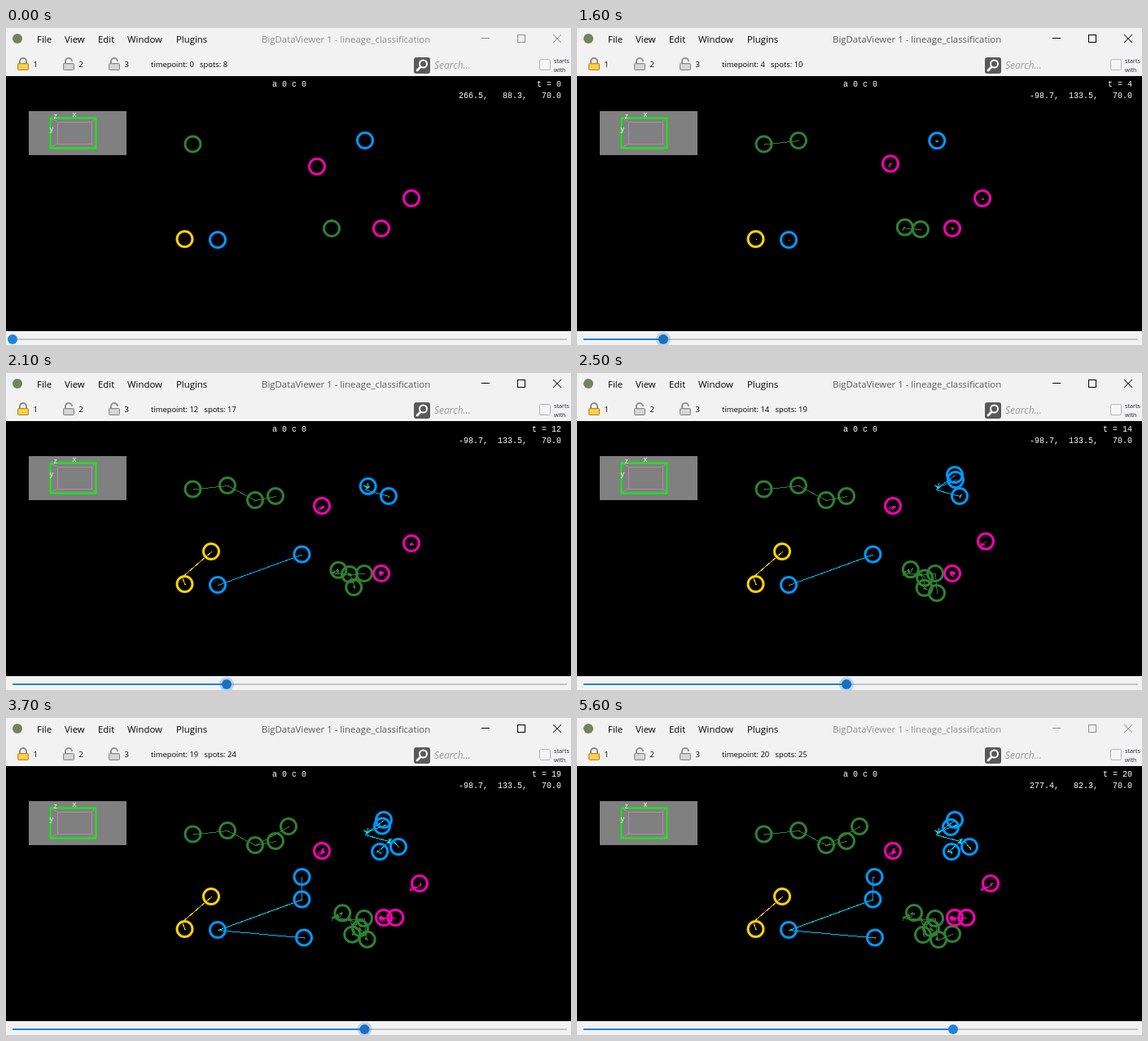
An HTML page that plays this animation: 694x389 px, repeating every 5.7 s.

```html
<!DOCTYPE html>
<html lang="en">
<head>
<meta charset="utf-8">
<title>Lineage classification viewer</title>
<style>
  html, body { margin: 0; width: 100%; height: 100%; overflow: hidden; background: #f2f2f2; }
  svg { display: block; width: 694px; height: 389px; }
  text { font-family: "Open Sans", "Noto Sans", sans-serif; white-space: pre; }
  .menu { font-size: 11.4px; }
  .small { font-size: 9.4px; }
  .tiny { font-size: 7.2px; fill: #1c2430; }
  .mono { font: 10px "Liberation Mono", "DejaVu Sans Mono", monospace; fill: #fff; }
  .axis { font: 9px "Liberation Sans", Arial, sans-serif; fill: #fff; }
  .end { text-anchor: end; }
  #trails { fill: none; stroke-linecap: square; shape-rendering: crispEdges; }
  #spots { fill: none; stroke-width: 3; }
  #frame { --title: #8c8c8c; --icon: #8c8c8c; }
  #frame.active { --title: #595959; --icon: #000; }
  #title { fill: var(--title); }
  #buttons { fill: none; stroke: var(--icon); }
</style>
</head>
<body>
<svg id="frame" viewBox="0 0 694 389">
  <rect width="694" height="389" fill="#f2f2f2"/>
  <circle cx="14" cy="13" r="6" fill="#71835f"/>
  <g class="menu">
    <text x="38" y="18">File</text>
    <text x="72" y="18">View</text>
    <text x="113" y="18">Edit</text>
    <text x="149" y="18">Window</text>
    <text x="209" y="18">Plugins</text>
    <text id="title" x="314" y="18">BigDataViewer 1 - lineage_classification</text>
  </g>
  <g id="buttons">
    <path d="M584 12.5h10M628.5 8.5h9v9h-9z" shape-rendering="crispEdges"/>
    <path d="M672 8l10 10M682 8l-10 10"/>
  </g>

  <g class="small">
    <g fill="none" stroke-width="2">
      <path d="M17 44v-3a4 4 0 0 1 8 0v3" stroke="#8b8b8b"/>
      <path d="M73 44v-3a4 4 0 0 1 8 0M129 44v-3a4 4 0 0 1 8 0" stroke="#909090"/>
    </g>
    <rect x="14.5" y="43.5" width="13" height="8" rx="1" fill="#f5c433" stroke="#b98a1d"/>
    <g fill="#c9c9c9" stroke="#888">
      <rect x="70.5" y="43.5" width="13" height="8" rx="1"/>
      <rect x="126.5" y="43.5" width="13" height="8" rx="1"/>
    </g>
    <path d="M16 46.5h10M16 49h10" stroke="#ffe48a"/>
    <path d="M72 46.5h10M72 49h10M128 46.5h10M128 49h10" stroke="#e8e8e8"/>
    <text x="33.5" y="48">1</text>
    <text x="89.5" y="48">2</text>
    <text x="145.5" y="48">3</text>
    <text id="status" x="178" y="48"></text>
  </g>
  <rect x="501" y="36" width="20" height="20" rx="3" fill="#595959"/>
  <circle cx="512.5" cy="44" r="4.5" fill="none" stroke="#fff" stroke-width="2"/>
  <path d="M509 48l-4 4" stroke="#fff" stroke-width="2.6" stroke-linecap="round"/>
  <text x="526" y="50" font-size="12" font-style="italic" fill="#999">Search...</text>
  <rect x="655.5" y="38.5" width="13" height="13" rx="2" fill="#f5f5f5" stroke="#b3b3b3"/>
  <text class="tiny" x="673" y="43">starts</text>
  <text class="tiny" x="673" y="54">with</text>

  <rect y="59" width="694" height="313"/>
  <rect x="28" y="102" width="120" height="54" fill="#808080"/>
  <g fill="none">
    <path d="M54 110l9 5M111 110l-6 5M54 147l9-5M111 147l-6-5M63.5 115.5h42v27h-42z" stroke="#b785b7"/>
    <path d="M54.5 110.5h56v37h-56z" stroke="#0f0" stroke-width="1.8"/>
  </g>
  <g class="axis">
    <text x="81.5" y="109">x</text>
    <text x="53.5" y="127">y</text>
    <text x="58.5" y="111">z</text>
  </g>
  <text class="mono" x="327" y="72">a 0 c 0</text>
  <text id="time" class="mono end" x="682" y="72"></text>
  <text id="coords" class="mono end" x="682" y="86"></text>
  <g id="trails" transform="translate(.5 .5)"></g>
  <g id="spots"></g>

  <path d="M8 382H689" stroke="#c4c4c4" stroke-width="2"/>
  <path id="track" stroke="#1f83e0" stroke-width="2"/>
  <circle id="halo" cy="382" r="9" fill="#1f83e0" fill-opacity=".28"/>
  <circle id="knob" cy="382" r="6"/>
</svg>
<script>
const LOOP = 5700, STEP = 100, LAST = 20;
const $ = id => document.getElementById(id);

const BLUE = [0, 153, 255], CYAN = [0, 218, 240];
const GREEN = [47, 128, 50], PINK = [255, 0, 178], GOLD = [255, 212, 0];
const rgb = c => `rgb(${c})`;
const mix = (a, b, k) => a.map((v, i) => v + (b[i] - v) * k);
const clamp = k => Math.min(Math.max(k, 0), 1);

// A cell appears at timepoint `birth`, drifts by `move` during `over`,
// and is linked to its parent, optionally by way of one bend.
const cells = [];
function cell(parent, birth, x, y, options = {}) {
  const { move = [0, 0], until = LAST, over = [birth, until] } = options;
  const made = {
    ...options, parent, birth, until, move, over, start: [x, y],
    color: options.color || parent.color, seed: cells.length
  };
  cells.push(made);
  return made;
}

const g1 = cell(null, 0, 229.5, 142.5, { color: GREEN });
const g2 = cell(g1, 3, 272, 138);
const g3 = cell(g2, 6, 306, 156);
cell(g3, 11, 331, 151);
cell(g3, 18, 347, 133);

const g4 = cell(null, 0, 400, 246, { color: GREEN, move: [14, -7] });
const g5 = cell(g4, 2, 422, 247, { move: [13, 11], over: [12, 17] });
const g6 = cell(g5, 8, 440, 246);
cell(g5, 9, 428, 262, { move: [-3, 4] });
const g7 = cell(g6, 14, 442, 270, { move: [2, 2] });
cell(g7, 20, 461, 265);

const b1 = cell(null, 0, 260, 260, { color: BLUE });
const b2 = cell(b1, 10, 363.4, 222.5);
cell(b1, 16, 366, 269.5);
cell(b2, 19, 363.5, 195, { move: [2, 0] });

const b3 = cell(null, 0, 441, 138, { color: BLUE, move: [4, 1], until: 13 });
const b4 = cell(b3, 10, 470, 151, { move: [12, 7], over: [17, 19], via: [441, 143] });
cell(b3, 14, 464, 125);
cell(b3, 14, 465, 131, { move: [-6, 3], over: [18, 20] });
cell(b4, 15, 456, 164, { move: [4, 0] });

cell(null, 0, 382, 170, { color: PINK, move: [6, -7], over: [0, 8] });
cell(null, 0, 498, 209, { color: PINK, move: [10, -6], over: [12, 17] });
const p1 = cell(null, 0, 461, 246, { color: PINK, move: [3, -1], over: [17, 19] });
cell(p1, 19, 478.4, 245);

const y1 = cell(null, 0, 219.5, 259, { color: GOLD });
cell(y1, 7, 252, 219, { via: [216, 250] });

function place({ start, move, over: [from, to] }, point) {
  const k = clamp((point - from) / (to - from || 1));
  return start.map((v, i) => v + move[i] * k);
}

// Repeatable noise in -1..1.
function noise(seed, n) {
  const v = Math.sin(seed * 127.1 + n * 311.7) * 43758.5453;
  return (v - Math.floor(v)) * 2 - 1;
}

// Moving cells leave a small scribble that grows with every timepoint.
function trail(c, point) {
  const wander = c.move.some(Boolean) ? Math.min(point - c.birth, 6) / 2 : 0;
  const path = [];
  for (let t = c.birth; t <= Math.min(point, c.until); t++) {
    const spread = t === point ? 0 : wander;
    path.push(place(c, t).map((v, i) => v + noise(c.seed + i * 50, t) * spread));
  }
  return path;
}

const drawPath = (points, color) =>
  `<path d="M${points.join('L')}" stroke="${color}"/>`;

function drawScene(point) {
  const born = cells.filter(c => c.birth <= point);
  const alive = born.filter(c => c.until >= point);

  $('trails').innerHTML = born.map(c => {
    const age = point - c.birth;
    const color = rgb(c.color === BLUE ? mix(BLUE, CYAN, clamp(age / 7)) : c.color);
    const link = c.parent
      ? drawPath([place(c.parent, c.birth), ...(c.via ? [c.via] : []), c.start], color)
      : '';
    return link + (age ? drawPath(trail(c, point), color) : '');
  }).join('');

  $('spots').innerHTML = alive.map(c => {
    const [x, y] = place(c, point);
    return `<circle cx="${x}" cy="${y}" r="9.5" stroke="${rgb(c.color)}"/>`;
  }).join('');

  $('status').textContent = `timepoint: ${point}   spots: ${alive.length}`;
  $('time').textContent = `t = ${point}`;
}

// Key poses of the slider and the mouse: [ms, ...values].
const drag = [
  [1000, 8], [1500, 88], [1600, 106], [2100, 271], [2900, 391],
  [3500, 437], [3600, 437], [3800, 444], [4000, 444], [4400, 462]
];
const mouse = [
  [0, 266.5, 88.3], [400, -98.7, 133.5], [4600, -98.7, 133.5], [4900, 277.4, 82.3]
];

function sample(keys, ms) {
  const next = keys.findIndex(key => key[0] > ms);
  if (next === 0) return keys[0].slice(1);
  if (next < 0) return keys[keys.length - 1].slice(1);
  const a = keys[next - 1], b = keys[next];
  return mix(a, b, (ms - a[0]) / (b[0] - a[0])).slice(1);
}

function knobColor(ms) {
  if (ms < 600 || ms >= 4700) return '#1f83e0';
  return ms >= 1000 && ms < 4400 ? '#1b6fbf' : '#1d79cf';
}

function render(ms) {
  const [x] = sample(drag, ms);
  drawScene(Math.round((x - 8) / 22.7));

  const active = ms >= 1000 && ms < 5600;
  $('frame').classList.toggle('active', active);
  $('halo').style.display = active ? '' : 'none';
  $('halo').setAttribute('cx', x);
  $('knob').setAttribute('cx', x);
  $('knob').setAttribute('fill', knobColor(ms));
  $('track').setAttribute('d', `M8 382H${x}`);

  const [mx, my] = sample(mouse, ms).map(v => v.toFixed(1));
  $('coords').textContent = `${mx}, ${my.padStart(6)},   70.0`;
}

const start = performance.now();
let shown = -1;
function tick() {
  const ms = Math.floor((performance.now() - start) % LOOP / STEP) * STEP;
  if (ms !== shown) render(shown = ms);
  requestAnimationFrame(tick);
}
tick();
</script>
</body>
</html>
```
